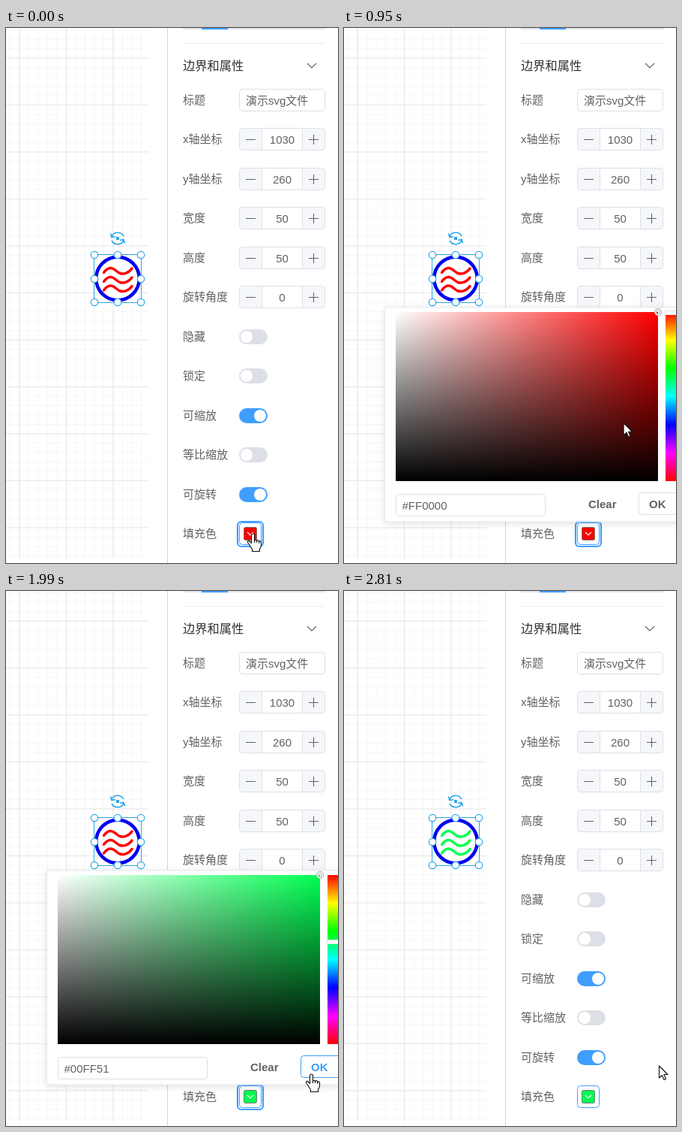
An HTML page that plays this animation: 443 px wide and 712 px high, repeating every 3.41 s.

```html
<!DOCTYPE html>
<html lang="zh">
<head>
<meta charset="utf-8">
<style>
html, body { margin: 0; width: 100%; height: 100%; overflow: hidden; background: #fff; }
svg { display: block; width: 443px; height: 712px; }
text { font: 15px "Liberation Sans", "Noto Sans CJK SC", "Noto Sans CJK", sans-serif; fill: #606266; }
.title { font-size: 16.25px; fill: #303133; }
.mid { text-anchor: middle; }
.bold { font-weight: bold; }
.line { fill: none; stroke: #606266; stroke-width: 1.1; }
.box { fill: #fff; stroke: #dcdfe6; }
.tool { fill: none; stroke: #2ba6e8; stroke-width: 1.2; }
.pointer { fill: #fff; stroke: #111; stroke-width: 1.1; stroke-linejoin: round; }
.hover rect { stroke: #409eff; }
.hover text { fill: #409eff; }
</style>
</head>
<body>
<svg viewBox="0 0 443 712">
  <defs>
    <pattern id="minor" width="12.5" height="12.5" patternUnits="userSpaceOnUse" patternTransform="translate(17.5 39.5)">
      <path d="M.5 0V12.5M0 .5H12.5" stroke="#f6f6f6"/>
    </pattern>
    <pattern id="major" width="62.5" height="62.5" patternUnits="userSpaceOnUse" patternTransform="translate(17.5 39.5)">
      <path d="M.5 0V62.5M0 .5H62.5" stroke="#e6e6e6"/>
    </pattern>
    <linearGradient id="white"><stop stop-color="#fff"/><stop offset="1" stop-color="#fff" stop-opacity="0"/></linearGradient>
    <linearGradient id="black" x2="0" y2="1"><stop stop-opacity="0"/><stop offset="1"/></linearGradient>
    <linearGradient id="hues" x2="0" y2="1"></linearGradient>
    <filter id="shadow" x="-10%" y="-10%" width="120%" height="120%">
      <feDropShadow dx="0" dy="2" stdDeviation="5" flood-opacity=".12"/>
    </filter>
  </defs>

  <rect width="190" height="706" fill="url(#minor)"/>
  <rect width="190" height="706" fill="url(#major)"/>

  <circle cx="149" cy="333.5" r="28.8" fill="#fff" stroke="#0000f0" stroke-width="4.5"/>
  <g id="waves" fill="none" stroke-width="3.4" stroke-linecap="round"></g>
  <rect class="tool" x="117.5" y="301.5" width="63" height="64" style="stroke-width:1"/>
  <g id="handles" class="tool" style="fill:#fff"></g>
  <path class="tool" style="stroke-width:1.6" d="M141 278C143 271 153 270 157 277M157 282C155 289 145 290 141 283M139.5 273.5L141 278.5L146 277.5M158.500 286.500L157 281.500L152 282.500"/>
  <rect x="147" y="278" width="4" height="4" fill="#2ba6e8"/>

  <path d="M215.500 0V712" stroke="#d3d3d3"/>
  <path d="M236 1H426" stroke="#e4e7ed" stroke-width="2"/>
  <path d="M261 1H296" stroke="#409eff" stroke-width="2"/>
  <path d="M236 20.500H426" stroke="#ebeef5"/>
  <text class="title" x="236" y="56">边界和属性</text>
  <path class="line" d="M402 47L408 53L414 47"/>
  <g id="form"></g>

  <rect id="focus" x="309" y="657" width="34" height="33" rx="5" fill="none" stroke="#409eff" stroke-width="2.2"/>
  <rect x="311.500" y="658.500" width="29" height="29" rx="4" fill="#fff" stroke="#409eff"/>
  <rect id="swatch" x="317.500" y="664.500" width="17" height="17" rx="2" stroke="#777"/>
  <path d="M322 671L326 675L330 671" fill="none" stroke="#fff" stroke-width="1.2"/>

  <g id="popup">
    <rect x="54.500" y="372" width="420" height="285" rx="4" fill="#fff" stroke="#e4e7ed" filter="url(#shadow)"/>
    <rect id="tint" x="69" y="378" width="350" height="225"/>
    <rect x="69" y="378" width="350" height="225" fill="url(#white)"/>
    <rect x="69" y="378" width="350" height="225" fill="url(#black)"/>
    <circle cx="419" cy="378" r="3.500" fill="none" stroke="#999" stroke-width="3"/>
    <circle cx="419" cy="378" r="3.500" fill="none" stroke="#fff" stroke-width="1.600"/>
    <rect x="429" y="378" width="15" height="225" fill="url(#hues)"/>
    <rect id="thumb" x="428.500" width="20" height="5" rx="1" fill="#fff" stroke="#e0e0e0"/>
    <rect class="box" x="69.500" y="620.500" width="199" height="29" rx="4"/>
    <text id="hex" x="77.500" y="641"></text>
    <text class="bold" x="326" y="639">Clear</text>
    <g id="ok">
      <rect class="box" x="393.500" y="618.500" width="60" height="29" rx="4"/>
      <text class="bold" x="407" y="639">OK</text>
    </g>
  </g>

  <g id="cursor">
    <circle id="click" r="14" fill="#ff0" opacity=".5"/>
    <path id="arrow" class="pointer" d="M0 0V16L4 12.500L6.500 18.500L9 17.500L6.500 11.500H11.500Z"/>
    <g id="hand">
      <path class="pointer" d="M-2 2Q-2 0 0 0T2 2V9Q3 7.500 5 9Q7 8 8.200 10Q11 9.500 11 12V16Q11 18 9 20V23.500H-1V20.500Q-3 18 -4.500 15L-7 11.500Q-7.500 9 -5 9.500L-2 12.500Z"/>
      <path class="pointer" d="M2 8V12M5 9V12M8.200 10V13"/>
    </g>
  </g>
</svg>
<script>
const LOOP = 3410, STEP = 66.8, START = 260;
const $ = id => document.getElementById(id);
const show = (id, on) => $(id).style.display = on ? '' : 'none';
const within = (t, a, b) => t >= a && t < b;

const numberBox = (y, value) => `
  <rect class="box" x="311.5" y="${y - 14.5}" width="114" height="29" rx="4" style="fill:#f5f7fa"/>
  <path d="M341.5 ${y - 14.5}h54v29h-54z" class="box"/>
  <path class="line" d="M320 ${y + .5}h13M404 ${y + .5}h13M410.5 ${y - 6}v13"/>
  <text class="mid" x="368.5" y="${y + 6}">${value}</text>`;
const textBox = (y, value) => `
  <rect class="box" x="311.500" y="${y - 14.5}" width="114" height="29" rx="4"/>
  <text x="320" y="${y + 6}">${value}</text>`;
const toggle = (y, on) => `
  <rect x="311" y="${y - 10}" width="38" height="20" rx="10" fill="${on ? '#409eff' : '#dcdfe6'}"/>
  <circle cx="${on ? 339 : 321}" cy="${y}" r="8" fill="#fff"/>`;

const rows = [
  ['标题', textBox, '演示svg文件'],
  ['x轴坐标', numberBox, 1030], ['y轴坐标', numberBox, 260],
  ['宽度', numberBox, 50], ['高度', numberBox, 50], ['旋转角度', numberBox, 0],
  ['隐藏', toggle, false], ['锁定', toggle, false], ['可缩放', toggle, true],
  ['等比缩放', toggle, false], ['可旋转', toggle, true],
  ['填充色', () => '']
];
$('form').innerHTML = rows.map(([label, control, value], i) => {
  const y = Math.round(95.8 + 52.5 * i);
  return `<text x="236" y="${y + 5}">${label}</text>` + control(y, value);
}).join('');

$('waves').innerHTML = [0, 12, 23.5].map(dy =>
  `<path d="M130.5 ${325.500 + dy}C140 ${312 + dy} 147 ${325 + dy} 152 ${326.500 + dy}S164 ${326 + dy} 168 ${320 + dy}"/>`).join('');
$('handles').innerHTML = [302, 334, 365].flatMap(y => [118, 149, 180]
  .filter(x => x !== 149 || y !== 334)
  .map(x => `<circle cx="${x}" cy="${y}" r="4.7"/>`)).join('');
$('hues').innerHTML = [0, 1, 2, 3, 4, 5, 6].map(i =>
  `<stop offset="${i / 6}" stop-color="hsl(${i * 60},100%,50%)"/>`).join('');

// time, x, y of the pointer tip
const path = [
  [0, 329.5, 673], [670, 329.5, 673], [740, 331, 618], [950, 378, 515], [1300, 438, 467],
  [1590, 438, 467], [1850, 428, 617], [1985, 407.5, 643], [2060, 407.5, 643],
  [2250, 420.5, 632], [LOOP, 420.5, 632]
];
function pointerAt(t) {
  const i = path.findIndex(p => p[0] > t);
  const [t0, x0, y0] = path[i - 1], [t1, x1, y1] = path[i];
  const k = (t - t0) / (t1 - t0);
  return [x0 + (x1 - x0) * k, y0 + (y1 - y0) * k];
}
const easeOut = x => 1 - (1 - Math.min(1, Math.max(0, x))) ** 5;

function draw(now) {
  const time = now % LOOP;
  const t = time < START ? 0 : START + Math.floor((time - START) / STEP + .1) * STEP;

  const open = t < 2498 ? easeOut((t - 394) / 300) : 1 - easeOut((t - 2498) / 300);
  $('popup').setAttribute('transform', `translate(0 ${657 * (1 - open)}) scale(1 ${open})`);
  $('popup').setAttribute('opacity', open);
  show('popup', open > .001);

  const picked = t >= 1570;
  const color = picked ? '#00FF51' : '#FF0000';
  $('tint').setAttribute('fill', color);
  $('swatch').setAttribute('fill', color);
  $('hex').textContent = color;
  $('thumb').setAttribute('y', picked ? 464.5 : 376.5);
  $('waves').setAttribute('stroke', t >= 2520 ? '#00FF51' : '#FF0000');
  $('ok').setAttribute('class', t >= 1900 ? 'hover' : '');
  show('focus', t < 2380);

  const hand = t < 700 || within(t, 1900, 2790);
  $('cursor').setAttribute('transform', `translate(${pointerAt(Math.min(t, LOOP - 1))})`);
  show('hand', hand);
  show('arrow', !hand);
  show('click', within(t, 1360, 1570) || within(t, 2260, 2400));
  requestAnimationFrame(() => draw(performance.now()));
}
draw(0);
</script>
</body>
</html>
```
